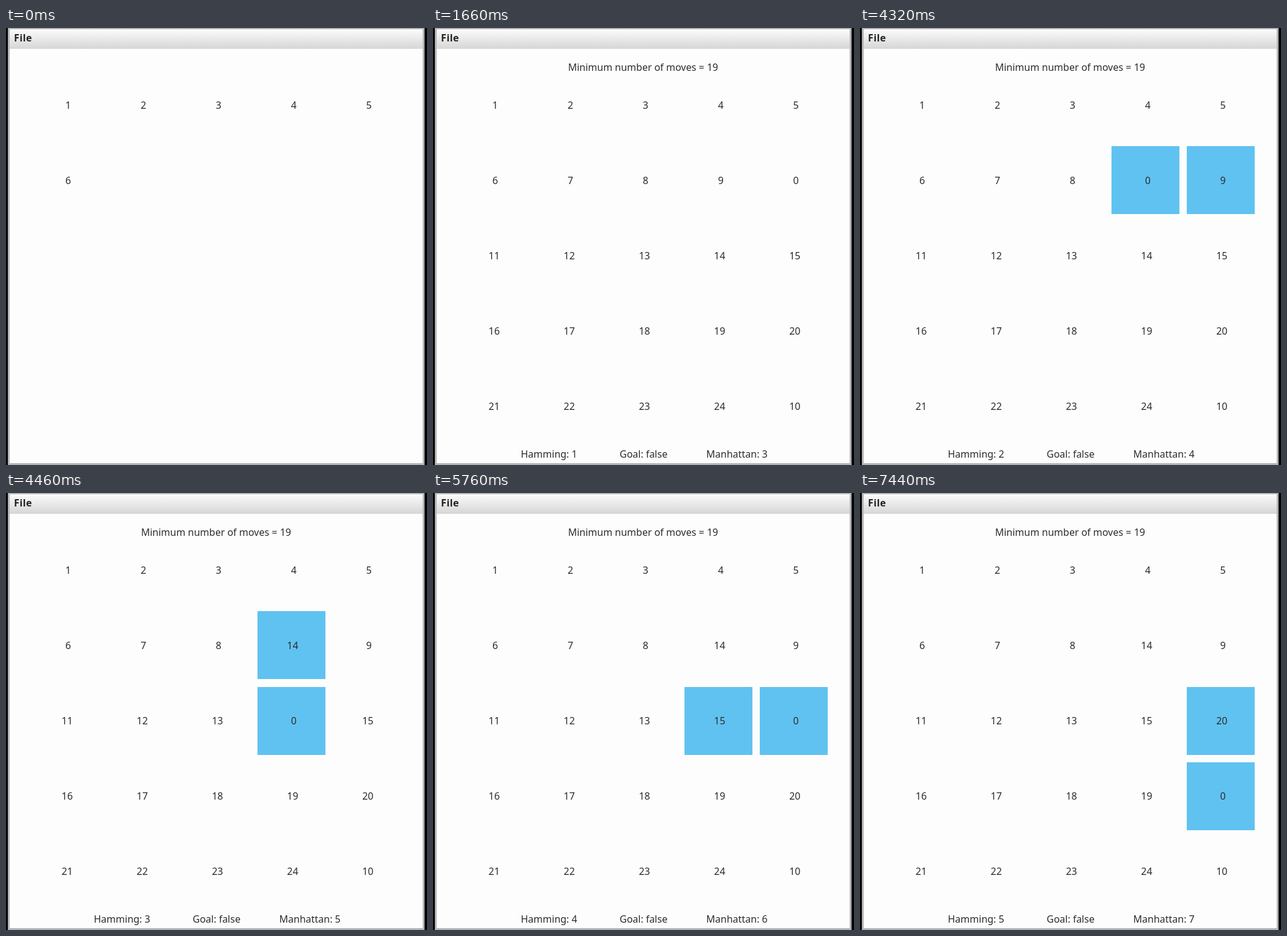
An HTML page that plays this animation: 688x714 px, repeating every 8 s.

```html
<!DOCTYPE html>
<html lang="en">
<head>
<meta charset="utf-8">
<title>Sliding puzzle</title>
<style>
  html, body { margin: 0; width: 100%; height: 100%; overflow: hidden; background: #000; }
  svg { display: block; width: 688px; height: 714px; }
  text { font: 16px "Noto Sans", "Open Sans", sans-serif; fill: #2c2c2c; }
  .menu { font-weight: 700; letter-spacing: .4px; fill: #222; }
  .cell { text-anchor: middle; }
</style>
</head>
<body>
<svg id="stage" viewBox="0 0 688 714">
  <defs>
    <linearGradient id="bar" x1="0" y1="0" x2="0" y2="1">
      <stop offset="0" stop-color="#fcfcfc"/>
      <stop offset=".3" stop-color="#f0f0f0"/>
      <stop offset="1" stop-color="#d6d6d6"/>
    </linearGradient>
  </defs>
  <rect width="688" height="714"/>
  <rect x="3" width="681" height="714" fill="#b2b4b6"/>
  <rect x="6" y="2" width="675" height="709" fill="#fdfdfd"/>
  <rect x="6" y="2" width="675" height="32" fill="url(#bar)"/>
  <text class="menu" x="13" y="22">File</text>
</svg>
<script>
const LOOP = 8000;
const SIZE = 5;
const PITCH = { x: 122.85, y: 123.2 };
const START = [1, 2, 3, 4, 5, 6, 7, 8, 9, 0, 11, 12, 13, 14, 15,
  16, 17, 18, 19, 20, 21, 22, 23, 24, 10];
const TITLE_AT = 1420;
const FILL = { from: 20, to: 440, steps: 9, shown: 6 };

// Each move: time, then the two cells that trade places
const MOVES = [
  [2820, 8, 9],
  [4340, 8, 13],
  [5760, 13, 14],
  [7280, 14, 19],
];

const stage = document.getElementById("stage");

function add(tag, attrs, content = "") {
  const node = document.createElementNS("http://www.w3.org/2000/svg", tag);
  for (const key in attrs) node.setAttribute(key, attrs[key]);
  node.textContent = content;
  stage.append(node);
  return node;
}

function show(node, on) {
  node.style.visibility = on ? "visible" : "hidden";
}

const col = i => i % SIZE;
const row = i => Math.floor(i / SIZE);

const tiles = START.map((_, i) => add("rect", {
  x: Math.round(42.6 + col(i) * PITCH.x),
  y: Math.round(70.2 + row(i) * PITCH.y),
  width: 111, height: 111, fill: "#60c2f1",
}));
const cells = START.map((_, i) => add("text", {
  class: "cell", y: Math.round(131.6 + row(i) * PITCH.y),
}));
const title = add("text", { x: 220.7, y: 70 }, "Minimum number of moves = 19");
const labels = [143.5, 305, 446.5].map(x => add("text", { x, y: 702 }));

function itemsShown(t) {
  if (t < FILL.from) return FILL.shown;
  const all = START.length + labels.length;
  const gap = (FILL.to - FILL.from) / (FILL.steps - 1);
  const step = Math.min(FILL.steps, 1 + Math.floor((t - FILL.from) / gap));
  return FILL.shown + Math.ceil((all - FILL.shown) * step / FILL.steps);
}

function render(t) {
  const done = MOVES.filter(([at]) => t >= at);
  const board = [...START];
  for (const [, a, b] of done) [board[a], board[b]] = [board[b], board[a]];
  const lit = done.length ? done[done.length - 1].slice(1) : [];
  const shown = itemsShown(t);

  board.forEach((value, i) => {
    // One-digit numbers sit further right, as in padded text
    const shift = value < 10 ? 1.8 : 0;
    cells[i].setAttribute("x", 99.9 + col(i) * PITCH.x + shift);
    cells[i].textContent = value;
    show(cells[i], i < shown);
    show(tiles[i], lit.includes(i));
  });

  const status = [
    `Hamming: ${1 + done.length}`,
    "Goal: false",
    `Manhattan: ${3 + done.length}`,
  ];
  labels.forEach((label, i) => {
    label.textContent = status[i];
    show(label, START.length + i < shown);
  });
  show(title, t >= TITLE_AT);
}

const begin = performance.now();
function tick() {
  render((performance.now() - begin) % LOOP);
  requestAnimationFrame(tick);
}
render(0);
requestAnimationFrame(tick);
</script>
</body>
</html>
```
